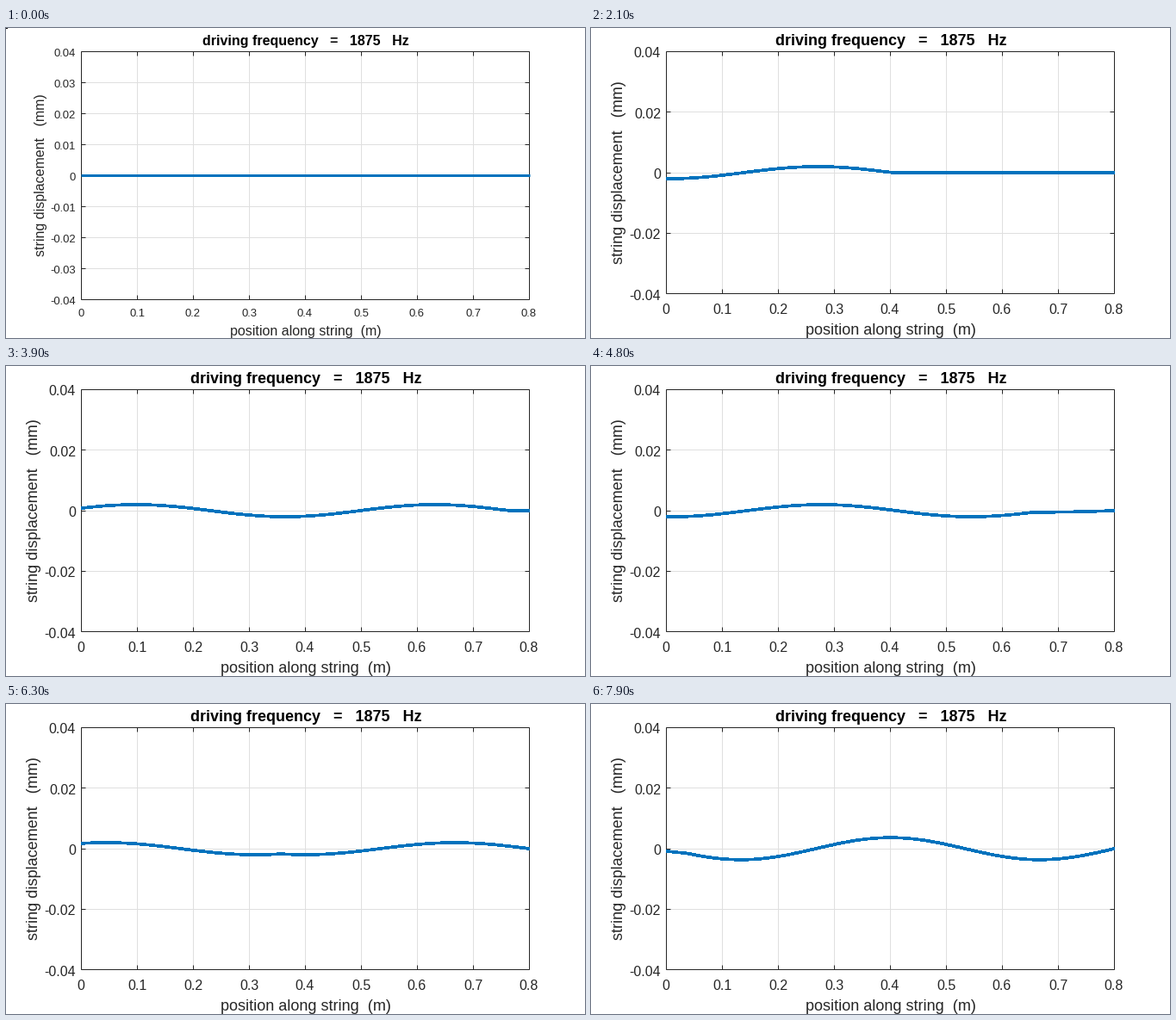
A matplotlib script that plays this animation: 672 by 360 pixels, repeating every 8000 ms.

```python
import numpy as np
import matplotlib.pyplot as plt
from matplotlib.animation import FuncAnimation
from matplotlib.patches import Rectangle

W, H, DPI = 672, 360, 100
FRAMES, INTERVAL = 80, 100
PT = 72 / DPI                      # points per pixel
LEFT, RIGHT, TOP = 87, 607, 27     # pixel columns and row of the box
INK, GRID, BLUE = "#262626", "#dfdfdf", "#0072bd"

LENGTH, Y_MAX = 0.8, 0.04          # string length (m), axis limit (mm)
AMP, WAVELENGTH = 0.002, 2 * LENGTH / 3
STEP, DELAY = 0.02, 0.8            # metres per frame, frames before the start
SOFT = 0.003                       # rounding of the wave front

plt.rcParams["font.family"] = "Liberation Sans"
plt.rcParams["toolbar"] = "None"
plt.rcParams["path.simplify"] = False

fig = plt.figure(figsize=(W / DPI, H / DPI), dpi=DPI, facecolor="white")
ax = fig.add_axes([0, 0, 1, 1])
ax.set_xlim(0, W)
ax.set_ylim(H, 0)
ax.axis("off")


def stroke(xs, ys, color=INK, width=1, z=2, **kw):
    return ax.plot(xs, ys, color=color, lw=width * PT, zorder=z,
                   solid_capstyle="butt", solid_joinstyle="round", **kw)[0]


def label(x, y, text, size, ha="center", **kw):
    kw.setdefault("color", INK)
    return ax.text(x, y, text, fontsize=size * PT, ha=ha, va="baseline",
                   rotation_mode="anchor", **kw)


def chart(bottom, rows, tick_size, label_size, drop, x_base, xlabel_base, ylabel_x):
    """Draw grid, box, ticks and labels; return all the artists."""
    parts = []
    for i in range(9):
        x = LEFT + (RIGHT - LEFT) * i / 8
        parts.append(label(x, x_base, f"{i / 10:g}", tick_size))
        if 0 < i < 8:
            parts.append(stroke([x, x], [TOP, bottom], GRID, z=1))
            parts.append(stroke([x, x], [TOP, TOP + 5]))
            parts.append(stroke([x, x], [bottom, bottom - 5]))
    for i in range(rows + 1):
        y = TOP + (bottom - TOP) * i / rows
        value = round(Y_MAX * (1 - 2 * i / rows), 3)
        parts.append(label(81, y + drop, f"{value:g}", tick_size, "right"))
        if 0 < i < rows:
            parts.append(stroke([LEFT, RIGHT], [y, y], GRID, z=1))
            parts.append(stroke([LEFT, LEFT + 5], [y, y]))
            parts.append(stroke([RIGHT, RIGHT - 5], [y, y]))
    box = Rectangle((LEFT, TOP), RIGHT - LEFT, bottom - TOP, fill=False,
                    ec=INK, lw=PT, zorder=2)
    parts.append(ax.add_patch(box))
    middle = (LEFT + RIGHT) / 2
    parts += [
        label(middle + 1, 20, "driving frequency   =   1875   Hz", label_size,
              weight="bold", color="black"),
        label(middle + 0.5, xlabel_base, "position along string  (m)", label_size),
        label(ylabel_x, (TOP + bottom) / 2, "string displacement   (mm)",
              label_size, rotation=90),
    ]
    return parts


def pulse(s):
    """Sine wave train at distance s behind its front, zero ahead of it."""
    return AMP * np.sin(2 * np.pi * SOFT * np.logaddexp(0, s / SOFT) / WAVELENGTH)


def displacement(front):
    return pulse(front - x) - pulse(front - (2 * LENGTH - x))


START_BOTTOM, BOTTOM = 315, 308
start = chart(START_BOTTOM, 8, 13, 16, 6, 335, 356.6, 45)
start.append(stroke([LEFT, RIGHT + 1], [(TOP + START_BOTTOM) / 2] * 2, BLUE, 3, 3))
start.append(ax.add_patch(Rectangle((0, 0), 2, 1, fc="black", lw=0)))
main = chart(BOTTOM, 4, 16, 18, 7.5, 332, 356, 37)

x = np.linspace(0, LENGTH, 321)
wave = stroke(LEFT + 0.5 + (RIGHT - LEFT) * x / LENGTH, np.zeros_like(x),
              BLUE, 8 / 3, 3, antialiased=False, snap=False)
main.append(wave)


def update(n):
    for part in start:
        part.set_visible(n == 0)
    for part in main:
        part.set_visible(n > 0)
    y = displacement(STEP * (n - DELAY))
    wave.set_ydata((TOP + BOTTOM + 1) / 2 - y * (BOTTOM - TOP) / (2 * Y_MAX))
    return start + main


anim = FuncAnimation(fig, update, frames=FRAMES, interval=INTERVAL,
                     repeat=True, repeat_delay=0, blit=False)
plt.show()
```
